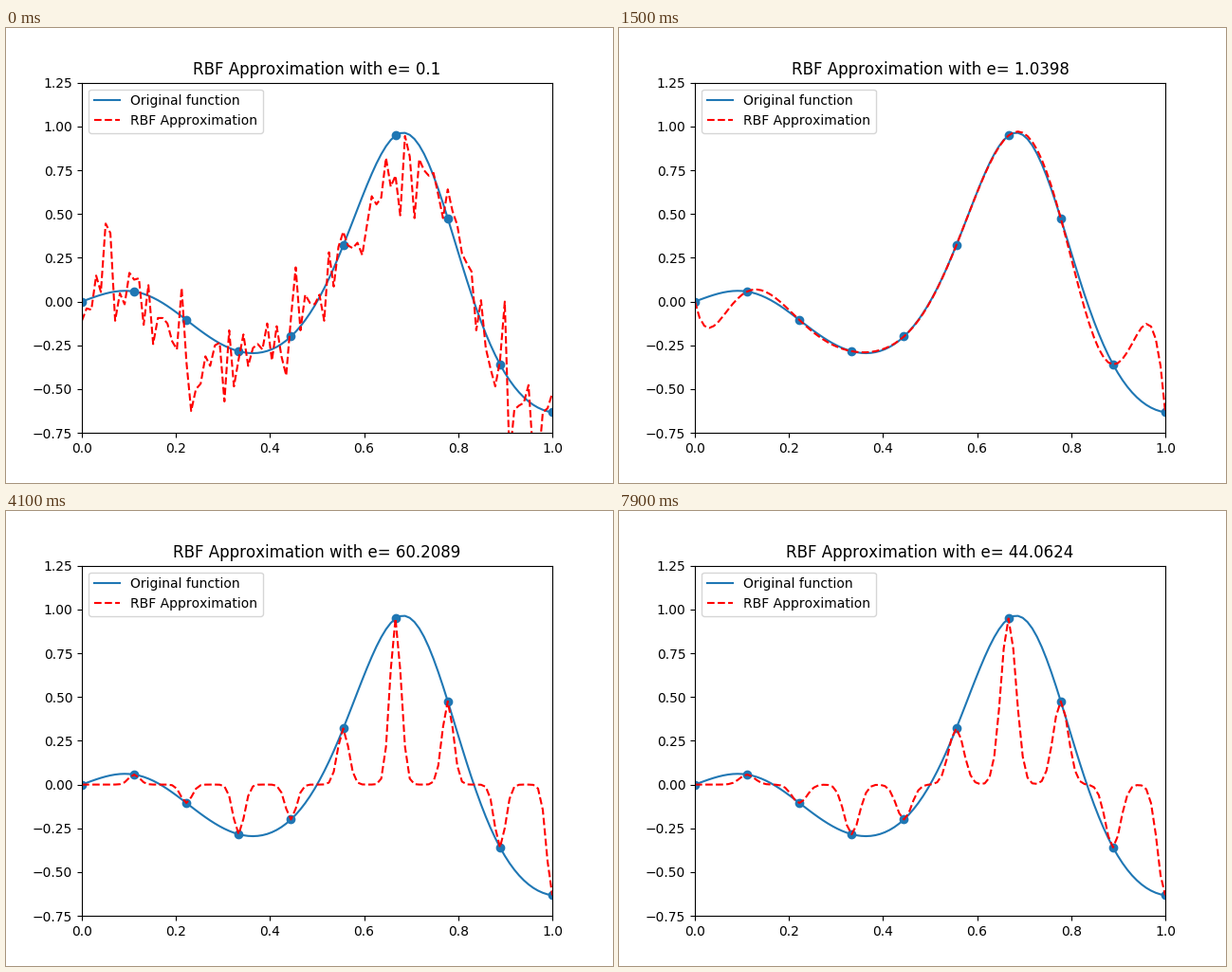
A matplotlib script for the animation above (8 s loop, 640 px wide and 480 px high).

```python
import numpy as np
import matplotlib.pyplot as plt
from matplotlib.animation import FuncAnimation

plt.rcParams["text.kerning_factor"] = 6


def f(x):
    return np.exp(x * np.cos(3 * np.pi * x)) - 1


def kernel(r, e):
    return np.exp(-(e * r) ** 2)


nodes = np.linspace(0, 1, 10)
x = np.linspace(0, 1, 100)
shapes = np.logspace(-1, 3, 60)
LAST = len(shapes) - 1
FRAMES = 80


def approximate(e):
    # Small e makes the system nearly singular, hence the jagged curve.
    matrix = kernel(np.abs(nodes[:, None] - nodes), e)
    weights = np.linalg.solve(matrix, f(nodes))
    return sum(w * kernel(np.abs(x - c), e) for w, c in zip(weights, nodes))


fig, ax = plt.subplots(figsize=(6.4, 4.8), dpi=100)
ax.plot(x, f(x), label="Original function")
approx, = ax.plot([], [], "r--", label="RBF Approximation")
ax.scatter(nodes, f(nodes))
ax.set_xlim(0, 1)
ax.set_ylim(-0.75, 1.25)
ax.legend(loc="upper left")
title = ax.set_title("")


def update(i):
    # The shape parameter grows to its maximum, then runs back down.
    e = shapes[LAST - abs(LAST - i)]
    approx.set_data(x, approximate(e))
    title.set_text(f"RBF Approximation with e= {round(float(e), 4)}")
    return approx, title


anim = FuncAnimation(fig, update, frames=FRAMES, interval=100,
                     repeat=True, repeat_delay=0)
plt.show()
```
